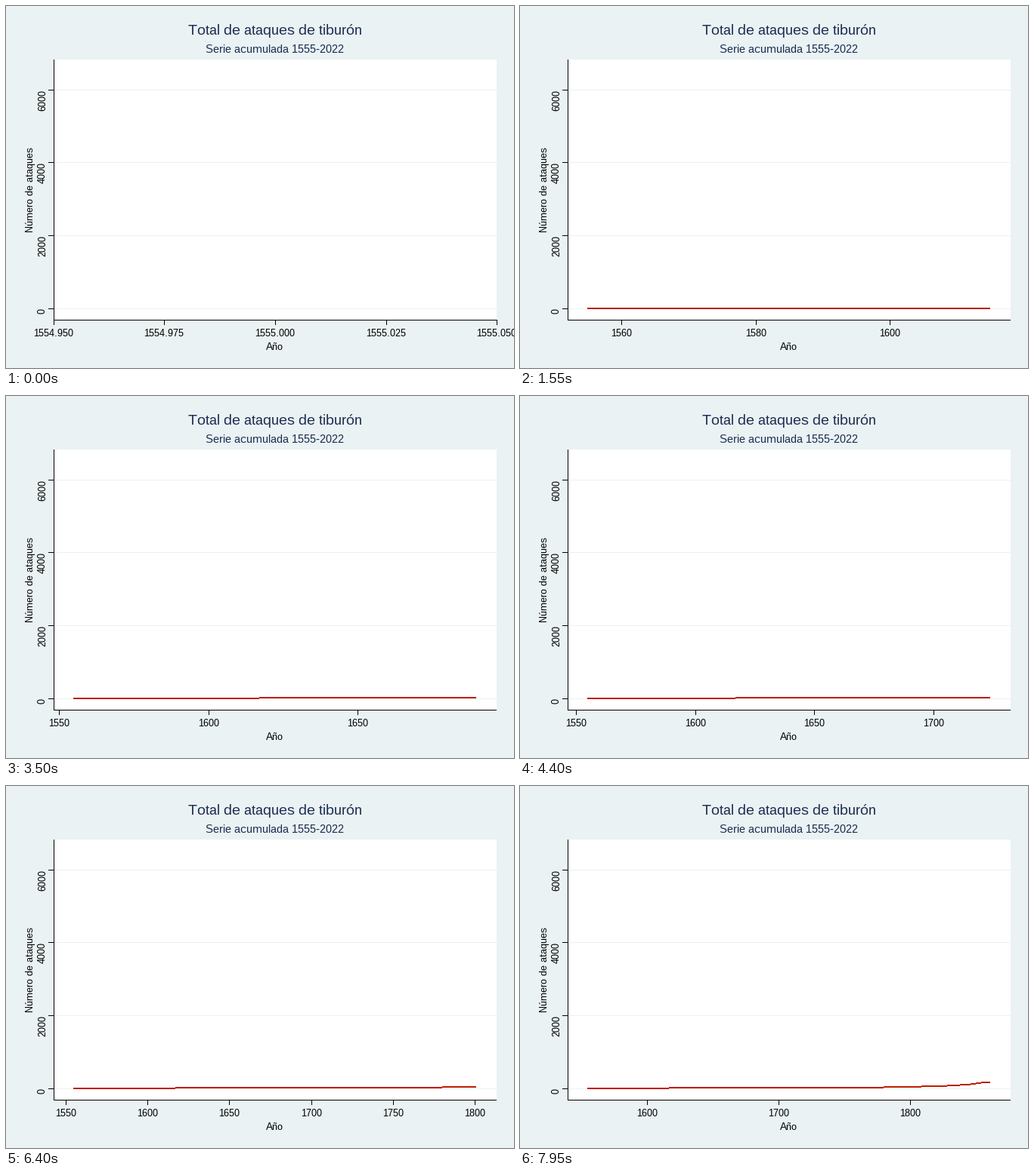
These frames come from a looping animation (672 px wide and 480 px high, 8 s). A matplotlib script:

```python
import math
from itertools import count

import matplotlib.pyplot as plt
import numpy as np
from matplotlib.animation import FuncAnimation
from matplotlib.patches import Rectangle

W, H, DPI = 672, 480, 96
FRAMES, INTERVAL = 160, 50
LEFT, RIGHT, TOP, BOTTOM = 63, 649, 71, 416
X_MIN, X_MAX = 62.84, 649.1  # exact ends of the horizontal scale
START = 1555
BG, NAVY, RED = "#eaf2f3", "#1e2d53", "#bf1d00"

# Years elapsed at a few frames; linear in between.
KEY_FRAMES = [0, 21, 32, 45, 70, 106, 128, 159]
KEY_YEARS = [0, 40, 62, 87, 134.7, 203, 246, 306]

# Years at which the curve climbs one more pixel.
CLIMBS = [START, 1617, 1780, 1808.5, 1828, 1838, 1846, 1850, 1854]

plt.rcParams.update({
    "font.family": "Liberation Sans",
    "text.hinting": "native",
    "text.hinting_factor": 1,
    "text.kerning_factor": 6,
})
fig = plt.figure(figsize=(W / DPI, H / DPI), dpi=DPI, facecolor=BG)
ax = fig.add_axes([0, 0, 1, 1])
ax.set_xlim(0, W)
ax.set_ylim(H, 0)
ax.axis("off")


def box(x, y, w, h, color, z=1):
    patch = Rectangle((x, y), w, h, facecolor=color, linewidth=0, snap=True, zorder=z)
    return ax.add_patch(patch)


def label(x, y, text, px=13, color="black", ha="center", rotation=0):
    return ax.text(x, y, text, fontsize=px * 72 / DPI, color=color, ha=ha,
                   va="baseline", rotation=rotation, rotation_mode="anchor", zorder=5)


def nice_breaks(lo, hi, m=5):
    """Extended Wilkinson tick positions for the range lo..hi."""
    steps = [1, 5, 2, 2.5, 4, 3]
    span = hi - lo
    tol = (0.1 * span) ** 2
    best, found = -2, None

    def score(simple, cover, dense):
        return 0.25 * simple + 0.2 * cover + 0.5 * dense + 0.05

    for j in count(1):
        for i, q in enumerate(steps):
            simple = 1 - i / (len(steps) - 1) - j
            if score(simple + 1, 1, 1) < best:
                return found
            for k in count(2):
                dense_max = 2 - (k - 1) / (m - 1) if k >= m else 1
                if score(simple + 1, 1, dense_max) < best:
                    break
                first_z = math.ceil(math.log10(span / (k + 1) / j / q))
                for z in count(first_z):
                    step = j * q * 10.0 ** z
                    extra = max(step * (k - 1) - span, 0) / 2
                    if score(simple + 1, 1 - extra ** 2 / tol, dense_max) < best:
                        break
                    low = math.floor(hi / step) * j - (k - 1) * j
                    high = math.ceil(lo / step) * j
                    for s in range(low, high + 1):
                        a = s * step / j
                        b = a + step * (k - 1)
                        cover = 1 - 0.5 * ((hi - b) ** 2 + (lo - a) ** 2) / tol
                        rate = (k - 1) / (b - a) * (max(b, hi) - min(a, lo)) / (m - 1)
                        value = score(simple, cover, 2 - max(rate, 1 / rate))
                        if value > best:
                            best = value
                            found = [a + step * n for n in range(k)]


def format_years(years):
    digits = 0
    while any(abs(y - round(y, digits)) > 1e-6 for y in years):
        digits += 1
    return [f"{y:.{digits}f}" for y in years]


def view(i):
    """Last visible year and the padded year range of the axis."""
    elapsed = float(np.interp(i, KEY_FRAMES, KEY_YEARS))
    pad = 0.05 * elapsed if elapsed else 0.05
    return START + elapsed, START - pad, START + elapsed + pad


# Panel, grid, axes
box(LEFT, TOP, RIGHT - LEFT, BOTTOM - TOP, "white")
for y, value in zip((401, 304, 207, 111), range(0, 8000, 2000)):
    box(LEFT, y, RIGHT - LEFT, 1, BG, 2)
    box(LEFT - 7, y, 7, 1, "black", 4)
    label(52, y, str(value), ha="right", rotation=90)
box(LEFT, TOP, 1, BOTTOM - TOP + 1, "black", 4)
box(LEFT, BOTTOM, RIGHT - LEFT, 1, "black", 4)

label(356, 38, "Total de ataques de tiburón", 19, NAVY)
label(355.5, 62, "Serie acumulada 1555-2022", 15, NAVY)
label(355.5, 456, "Año")
label(36, 244, "Número de ataques", rotation=90)

ticks = [(box(0, BOTTOM, 1, 7, "black", 4), label(0, 438, ""))
         for _ in range(12)]
curve = [box(0, 400 - k, 0, 2, RED, 3) for k in range(len(CLIMBS))]


def update(i):
    end, lo, hi = view(i)

    def to_x(year):
        return round(X_MIN + (X_MAX - X_MIN) * (year - lo) / (hi - lo))

    years = [y for y in nice_breaks(lo, hi) if lo - 1e-7 <= y <= hi + 1e-7]
    names = format_years(years)
    for n, (mark, text) in enumerate(ticks):
        shown = n < len(years)
        mark.set_visible(shown)
        text.set_visible(shown)
        if shown:
            x = to_x(years[n])
            mark.set_x(x)
            text.set_x(x)
            text.set_text(names[n])

    for part, a, b in zip(curve, CLIMBS, CLIMBS[1:] + [math.inf]):
        part.set_visible(end > a)
        if end > a:
            x = to_x(a)
            part.set_x(x)
            part.set_width(to_x(min(b, end)) - x)
    return curve


anim = FuncAnimation(fig, update, frames=FRAMES, interval=INTERVAL,
                     init_func=lambda: update(0), repeat=True, repeat_delay=0)
plt.show()
```
